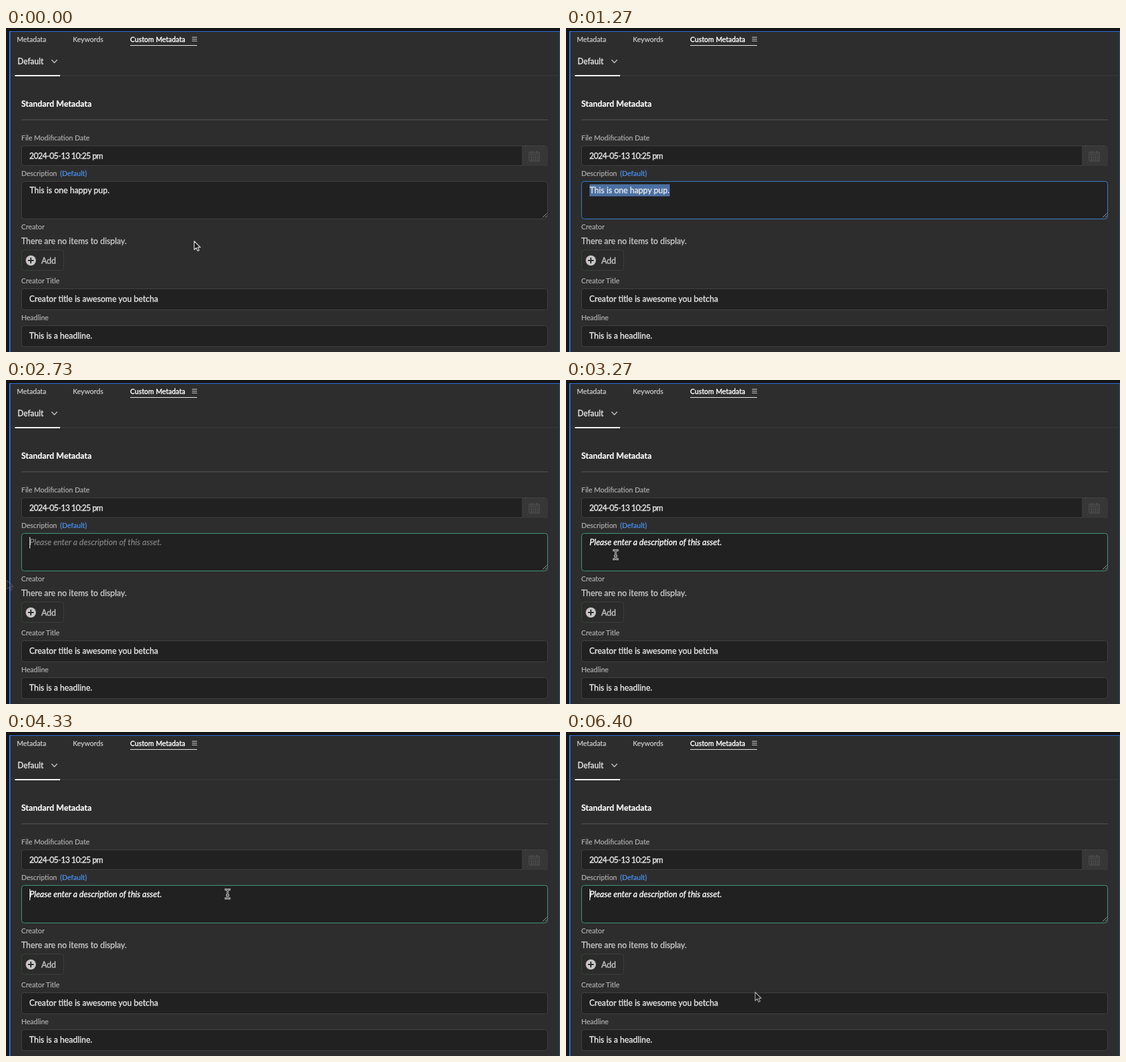
Recreate the animation shown at these times as an HTML page. Size 870 by 510 pixels, loop 6.47 s.

```html
<!DOCTYPE html>
<html lang="en">
<head>
<meta charset="utf-8">
<title>Metadata panel</title>
<style>
  html, body { margin: 0; width: 100%; height: 100%; overflow: hidden; background: #2d2d2d; }
  svg { display: block; width: 870px; height: 510px; }
  text { font-family: Lato, "Open Sans", sans-serif; font-size: 12.9px; fill: #e8e8e8; stroke: #e8e8e8; stroke-width: .35px; white-space: pre; }
  .label { font-size: 11px; fill: #b4b4b4; stroke: #b4b4b4; stroke-width: .15px; }
  .tab { font-size: 11px; fill: #d2d2d2; stroke: #d2d2d2; stroke-width: .2px; }
  .active { fill: #fff; stroke: #fff; stroke-width: .4px; }
  .title { font-size: 13px; font-weight: 700; fill: #fff; stroke: #fff; stroke-width: .2px; }
  .soft { fill: #c8c8c8; stroke: #c8c8c8; }
  .link { font-size: 11px; fill: #4b96f8; stroke: #4b96f8; stroke-width: .2px; }
  .hint { font-size: 13px; font-style: italic; }
  .field { fill: #212121; stroke: #424242; }
</style>
</head>
<body>
<svg id="stage" viewBox="0 0 870 510">
  <rect width="870" height="510" fill="#2d2d2d"/>
  <path d="M0 0H870V5H6V510H0Z" fill="#161616"/>
  <path d="M869.500 5V510" stroke="#2c4f8c"/>
  <path d="M5 5.500H870" stroke="#2f70e4"/>
  <path d="M6 5V510" stroke="#2f70e4" stroke-width="2"/>
  <path d="M195 27.500H300" stroke="#f0f0f0"/>
  <path d="M292 14.500H300M292 17.500H300M292 20.500H300" stroke="#d0d0d0"/>
  <path d="M71.500 50L76 54.500L80.500 50" fill="none" stroke="#b8b8b8" stroke-width="1.600"/>
  <path d="M8 75H868" stroke="#3c3c3c"/>
  <path d="M14 75H85" stroke="#fff" stroke-width="2"/>
  <path d="M24 144.500H851" stroke="#555"/>
  <g id="fields"></g>
  <path d="M810 186H847a4 4 0 0 1 4 4V213a4 4 0 0 1-4 4H810Z" fill="#373737"/>
  <g id="calendar" fill="none" stroke="#525252">
    <path d="M821.500 195.500H837.500V209.500H821.500ZM821.500 198.500H837.500M825.500 193V197M833.500 193V197"/>
    <path d="M824 201.500H836M824 204.500H836M824 207.500H836" stroke-width="2" stroke-dasharray="2 1.300"/>
  </g>
  <rect id="area" class="field" x="24.500" y="241.500" width="826" height="59" rx="4"/>
  <path d="M842.500 298.500L849.500 291.500M846.500 298.500L849.500 295.500" stroke="#a0a0a0"/>
  <rect x="24.500" y="349.500" width="66" height="32" rx="4" fill="#2b2b2b" stroke="#3b423b"/>
  <path d="M24.500 353V378" stroke="#1f5227"/>
  <circle cx="39" cy="366" r="8" fill="#c6c6c6"/>
  <path d="M34.500 366H43.500M39 361.500V370.500" stroke="#2b2b2b" stroke-width="2"/>
  <g id="labels"></g>
  <rect id="selection" x="37" y="246" width="126" height="19" fill="#4b70a2"/>
  <text id="value" x="37" y="260">This is one happy pup.</text>
  <text id="hint" class="hint" x="37" y="260">Please enter a description of this asset.</text>
  <rect id="caret" y="247" width="1" height="18" fill="#fff"/>
  <g id="cursor">
    <path id="arrow" d="M.500 .500V14L3.800 11L6 16L8.300 15L6.200 10.200H10.300Z" fill="#1c1c1c" stroke="#d8d8d8" stroke-width="1.200" stroke-linejoin="round"/>
    <g id="beam" fill="none" stroke-linecap="square">
      <path d="M-3 -7H-1.500L0 -6L1.500 -7H3M0 -6V6M-3 7H-1.500L0 6L1.500 7H3M-1 2H1" stroke="#e0e0e0" stroke-width="2.800"/>
      <path d="M-3 -7H-1.500L0 -6L1.500 -7H3M0 -6V6M-3 7H-1.500L0 6L1.500 7H3M-1 2H1" stroke="#1c1c1c" stroke-width="1"/>
    </g>
  </g>
</svg>
<script>
const LOOP = 6470, TICK = 200 / 3;
const el = id => document.getElementById(id);
const NS = "http://www.w3.org/2000/svg";

function add(parent, tag, attrs, content = "") {
  const node = document.createElementNS(NS, tag);
  for (const key in attrs) node.setAttribute(key, attrs[key]);
  node.textContent = content;
  el(parent).append(node);
}

for (const [y, h] of [[185.5, 31], [410.5, 33], [468.5, 33]])
  add("fields", "rect", { class: "field", x: 24.5, y, width: 826, height: h, rx: 4 });

const label = (x, y, content, cls = "", style = "") =>
  add("labels", "text", { x, y, class: cls, style }, content);

label(17, 22, "Metadata", "tab");
label(105, 22, "Keywords", "tab");
label(195, 22, "Custom Metadata", "tab active");
label(18, 57, "Default", "", "font-size:12.5px");
label(24, 124, "Standard Metadata", "title");
label(24, 177, "File Modification Date", "label");
label(36.5, 206, "2024-05-13 10:25 pm", "", "letter-spacing:-.6px");
label(24, 233, "Description", "label");
label(85, 233, "(Default)", "link");
label(24, 317, "Creator", "label");
label(24, 340, "There are no items to display.", "soft");
label(55.5, 371, "Add", "soft");
label(24, 402, "Creator Title", "label");
label(36.5, 431, "Creator title is awesome you betcha");
label(24, 460, "Headline", "label");
label(36.5, 489, "This is a headline.");

// Pointer stops: time, x, y
const path = [
  [200, 295, 335], [867, 198, 266], [933, 198, 266], [1000, 115, 272],
  [1067, 11, 284], [2733, 1, 315], [3267, 78, 275], [3333, 76, 274],
  [3533, 34, 266], [4267, 348, 255], [6200, 348, 255], [6400, 296.5, 409]
];

function pointer(t) {
  const next = path.findIndex(p => p[0] > t);
  if (next === 0) return path[0].slice(1);
  if (next < 0) return path[path.length - 1].slice(1);
  const [t0, x0, y0] = path[next - 1], [t1, x1, y1] = path[next];
  const u = (t - t0) / (t1 - t0), k = u * u * (3 - 2 * u);
  return [x0 + (x1 - x0) * k, y0 + (y1 - y0) * k];
}

const show = (id, on) => el(id).setAttribute("visibility", on ? "visible" : "hidden");

function borderColor(t) {
  if (t < 925) return "#424242";
  if (t < 990) return "#356a94";
  if (t < 2390) return "#3d7fd2";
  return t < 2460 ? "#3e82a0" : "#439a7f";
}

function draw(time) {
  const t = Math.min(96, Math.floor((time + 4) / TICK)) * TICK;
  const cleared = t > 2325;
  const [x, y] = pointer(t);
  const inside = x > 24 && y > 241 && y < 301;

  el("area").style.stroke = borderColor(t);
  show("value", !cleared);
  show("hint", cleared);
  show("selection", t > 1260 && !cleared);

  const bright = inside && t > 2740 || t > 3300;
  const tone = bright ? "#fff" : "#858585";
  el("hint").style.fill = el("hint").style.stroke = tone;
  el("hint").style.strokeWidth = bright ? ".35px" : ".2px";

  el("caret").setAttribute("x", cleared ? 37 : 163);
  show("caret", cleared ? (t - 2330) % 1000 < 530 : t > 925 && t < 1260);

  const away = t > 1100 && t < 2725;
  show("arrow", !away && !inside);
  show("beam", !away && inside);
  el("cursor").setAttribute("transform", `translate(${x.toFixed(1)} ${y.toFixed(1)})`);
  el("cursor").setAttribute("opacity", t > 2725 && t < 2780 ? .2 : t > 6390 ? .7 : 1);
}

const start = performance.now();
function frame() {
  draw((performance.now() - start) % LOOP);
  requestAnimationFrame(frame);
}
frame();
</script>
</body>
</html>
```
